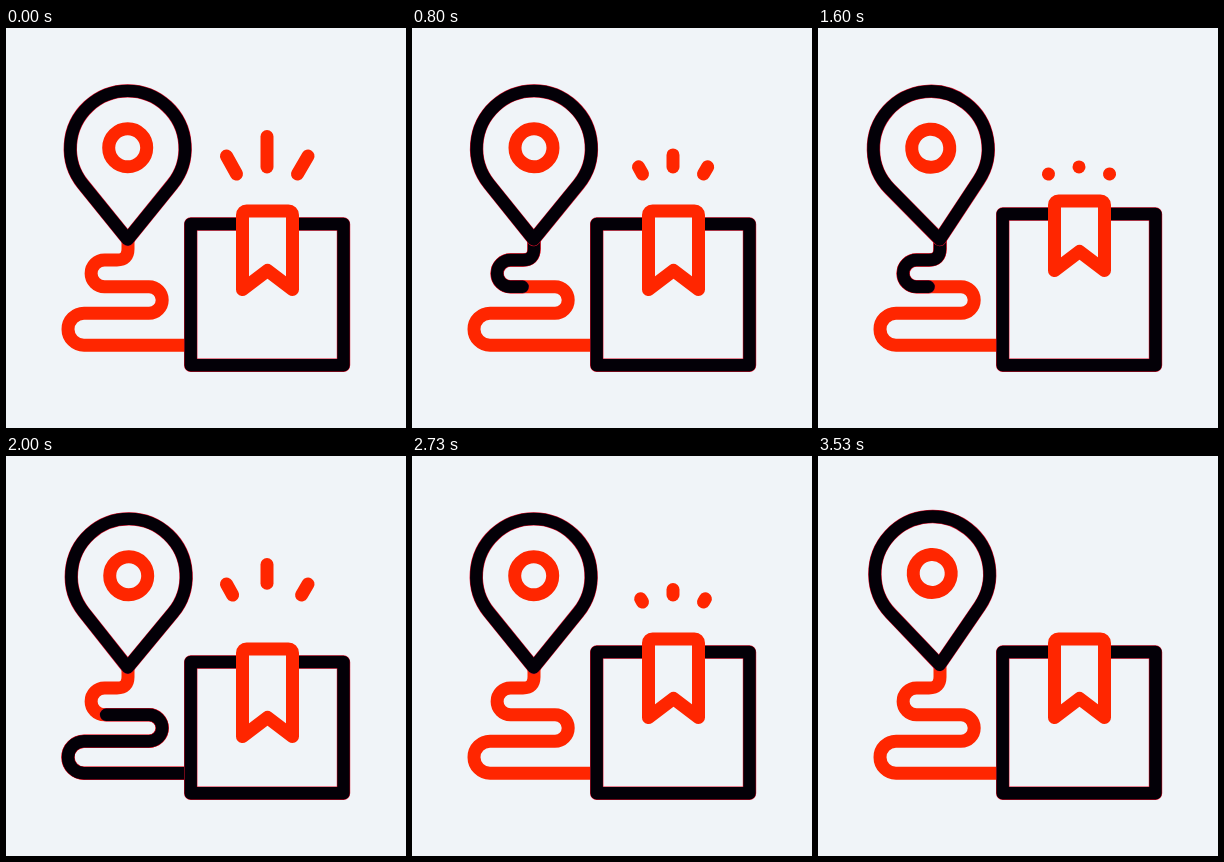
These frames come from a looping animation (400x400 px, 3.6 s). An HTML page:

```html
<!DOCTYPE html>
<html lang="en">
<head>
<meta charset="utf-8">
<title>Parcel delivery</title>
<style>
  html, body { margin: 0; width: 100%; height: 100%; overflow: hidden; background: #f0f4f8; }
  svg { display: block; width: 100vw; height: 100vh; }
  path, circle { fill: none; stroke: #ff2600; stroke-width: 13; stroke-linecap: round; stroke-linejoin: round; }
  .rim { stroke: #e0102c; stroke-width: 13.4; }
  .ink { stroke: #030007; stroke-width: 12.4; }
  #tag { fill: #f0f4f8; }
</style>
</head>
<body>
<svg viewBox="0 0 400 400">
  <path id="road" d="M122 212V221Q122 232 111 232H98.5a13.4 13.4 0 0 0 0 26.8H143a13.2 13.2 0 0 1 0 26.4H78a16 16 0 0 0 0 32H184"/>
  <g id="trail"></g>
  <g id="box"><path class="rim"/><path class="ink"/></g>
  <path id="tag"/>
  <g id="rays">
    <path pathLength="1" d="M230.5 146L220.5 128"/>
    <path pathLength="1" d="M261 139V108.5"/>
    <path pathLength="1" d="M291.5 146L302 128"/>
  </g>
  <g id="pin">
    <path class="rim" d="M121.7 211.5L77 156.3a57.4 57.4 0 1 1 89.4 0Z"/>
    <path class="ink" d="M121.7 211.5L77 156.3a57.4 57.4 0 1 1 89.4 0Z"/>
    <circle cx="121.7" cy="119.8" r="19"/>
  </g>
</svg>
<script>
  const LOOP = 3600, CYCLE = 3000, STEP = 1000 / 15;
  const $ = id => document.getElementById(id);
  const ease = x => (1 - Math.cos(Math.PI * Math.min(1, Math.max(0, x)))) / 2;
  const ramp = (t, from, to) => ease((t - from) / (to - from));

  // Eased value from [time, value] pairs
  function track(t, keys) {
    let v = keys[0][1];
    for (let i = 1; i < keys.length; i++) {
      const [t0, v0] = keys[i - 1], [t1, v1] = keys[i];
      if (t >= t0) v = v0 + (v1 - v0) * ramp(t, t0, t1);
    }
    return v;
  }

  const lift = [[0, 0], [200, -17], [650, 0]];
  const sway = [[400, 0], [600, -10], [1040, 14], [1430, -18], [1850, 7.6], [2220, -11], [2526, 0]];
  const squash = [[800, 0], [1200, 1], [1600, -1], [2000, 1], [2400, -1], [2700, 0]];
  // Ray bursts: grow start, grow end, fade start, fade end
  const bursts = [[-300, 0, 10, 290], [670, 970, 1000, 1290], [1590, 1860, 1880, 2160], [2650, 2950, 3010, 3290]];

  for (const name of ['rim', 'ink']) {
    const copy = $('road').cloneNode();
    copy.removeAttribute('id');
    copy.setAttribute('class', name);
    copy.setAttribute('pathLength', 1);
    $('trail').append(copy);
  }

  function trim(group, start, end, shown) {
    group.style.display = shown ? '' : 'none';
    for (const p of group.children) {
      p.style.strokeDasharray = `${Math.max(0, end - start)} 3`;
      p.style.strokeDashoffset = -start;
    }
  }

  function draw(t) {
    const angle = Math.asin(track(t, sway) / 92) * 180 / Math.PI;
    $('pin').setAttribute('transform', `translate(0 ${track(t, lift)}) rotate(${angle} 121.7 211.5)`);

    const s = track(t, squash);
    for (const p of $('box').children)
      p.setAttribute('d', `M184.7 ${196 + 10 * s}H337.5V337.3H184.7Z`);
    const foot = 261.5 + 19 * s;
    $('tag').setAttribute('d',
      `M236.5 ${foot}V${187 + 10 * s}a4 4 0 0 1 4 -4H282.5a4 4 0 0 1 4 4V${foot}L261.5 ${242.5 + 19 * s}Z`);

    const b = bursts.find(([from, , , to]) => t >= from && t < to);
    if (b) trim($('rays'), ramp(t, b[2], b[3]), ramp(t, b[0], b[1]), true);
    else trim($('rays'), 0, 0, false);

    const moving = t > 650 && t < 2250, p = (t - 650) % 800;
    trim($('trail'), ramp(p, 440, 800), ramp(p, 0, 460), moving);
  }

  function tick() {
    const t = performance.now() % LOOP;
    draw(Math.floor((t + 5) / STEP) * STEP % LOOP % CYCLE);
    requestAnimationFrame(tick);
  }
  tick();
</script>
</body>
</html>
```
